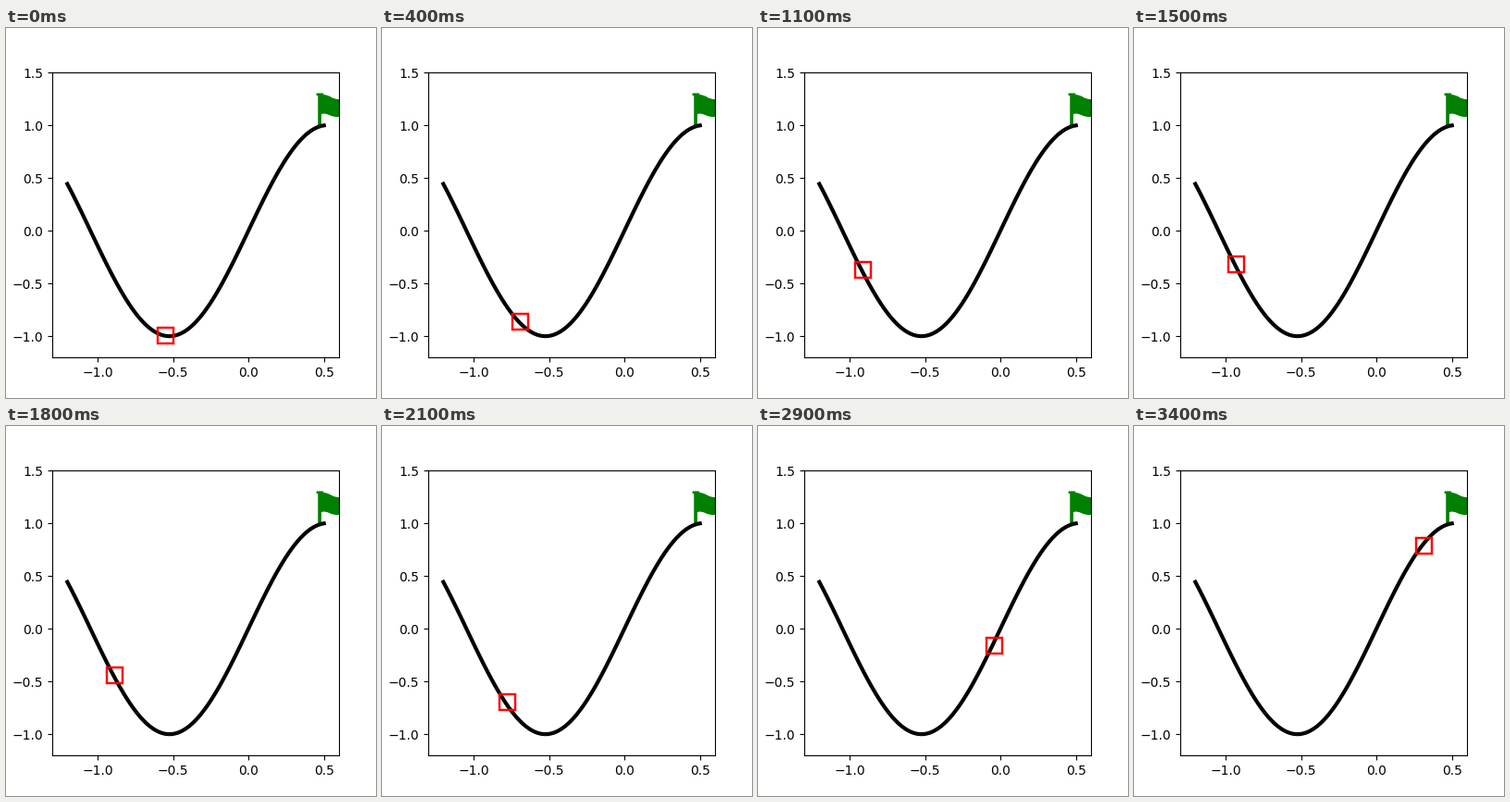
Recreate the animation shown at these times as a matplotlib script. Size 400 by 400 pixels, loop 3.5 s.

```python
import math

import numpy as np
import matplotlib.pyplot as plt
from matplotlib.animation import FuncAnimation
from matplotlib.markers import MarkerStyle
from matplotlib.patches import Rectangle
from matplotlib.transforms import Affine2D

SIZE = 400
FRAMES = 35
INTERVAL = 100
CAR = 17
FLAG_POINTS = 25

# Key poses of the car: (frame, x in pixels, speed in pixels per frame)
POSES = [(0, 172.6, -4.75), (13.5, 109.7, 0), (20.5, 131.3, 6.9),
         (27, 222.1, 18.2), (34, 313.3, 8.6)]

fig = plt.figure(figsize=(4, 4), dpi=100)
ax = fig.add_subplot()
ax.set_xlim(-1.3, 0.6)
ax.set_ylim(-1.2, 1.5)

# Pixel coordinates with the origin at the top left
pixels = Affine2D().scale(1, -1).translate(0, SIZE)


def hill(x):
    return np.sin(3 * x)


def car_x(frame):
    """Cubic Hermite interpolation between the key poses."""
    for (t0, x0, v0), (t1, x1, v1) in zip(POSES, POSES[1:]):
        if frame <= t1:
            break
    h = t1 - t0
    s = (frame - t0) / h
    return ((1 + 2 * s) * (1 - s) ** 2 * x0 + s * (1 - s) ** 2 * h * v0
            + s * s * (3 - 2 * s) * x1 + s * s * (s - 1) * h * v1)


def car_y(px):
    """Height of the hill under the car, in pixels."""
    x = -1.3 + (px - 1.9 - 50) * 1.9 / 310
    return 48.25 + (1.5 - hill(x)) * 308 / 2.7


def snap(value):
    return math.floor(value) + 0.5


def draw_flag(left, middle):
    """Flag symbol whose left edge and vertical middle are given in pixels."""
    marker = MarkerStyle("$\u2691$")
    outline = marker.get_path().transformed(marker.get_transform())
    scale = FLAG_POINTS * fig.dpi / 72
    center = left - outline.get_extents().x0 * scale
    ax.plot(center, middle, marker=marker, ms=FLAG_POINTS, color="green",
            transform=pixels, zorder=1.9)


xs = np.linspace(-1.2, 0.5, 100)
ax.plot(xs, hill(xs), color="black", lw=3)
draw_flag(335.2, 87.5)

car = Rectangle((0, 0), CAR, CAR, transform=pixels, fill=False,
                edgecolor="red", lw=1.75, snap=False, zorder=3)
ax.add_artist(car)


def update(frame):
    px = car_x(frame)
    car.set_xy((snap(px) - CAR / 2, snap(car_y(px)) - CAR / 2))
    return (car,)


anim = FuncAnimation(fig, update, frames=FRAMES, interval=INTERVAL,
                     repeat=True, repeat_delay=0)
plt.show()
```
